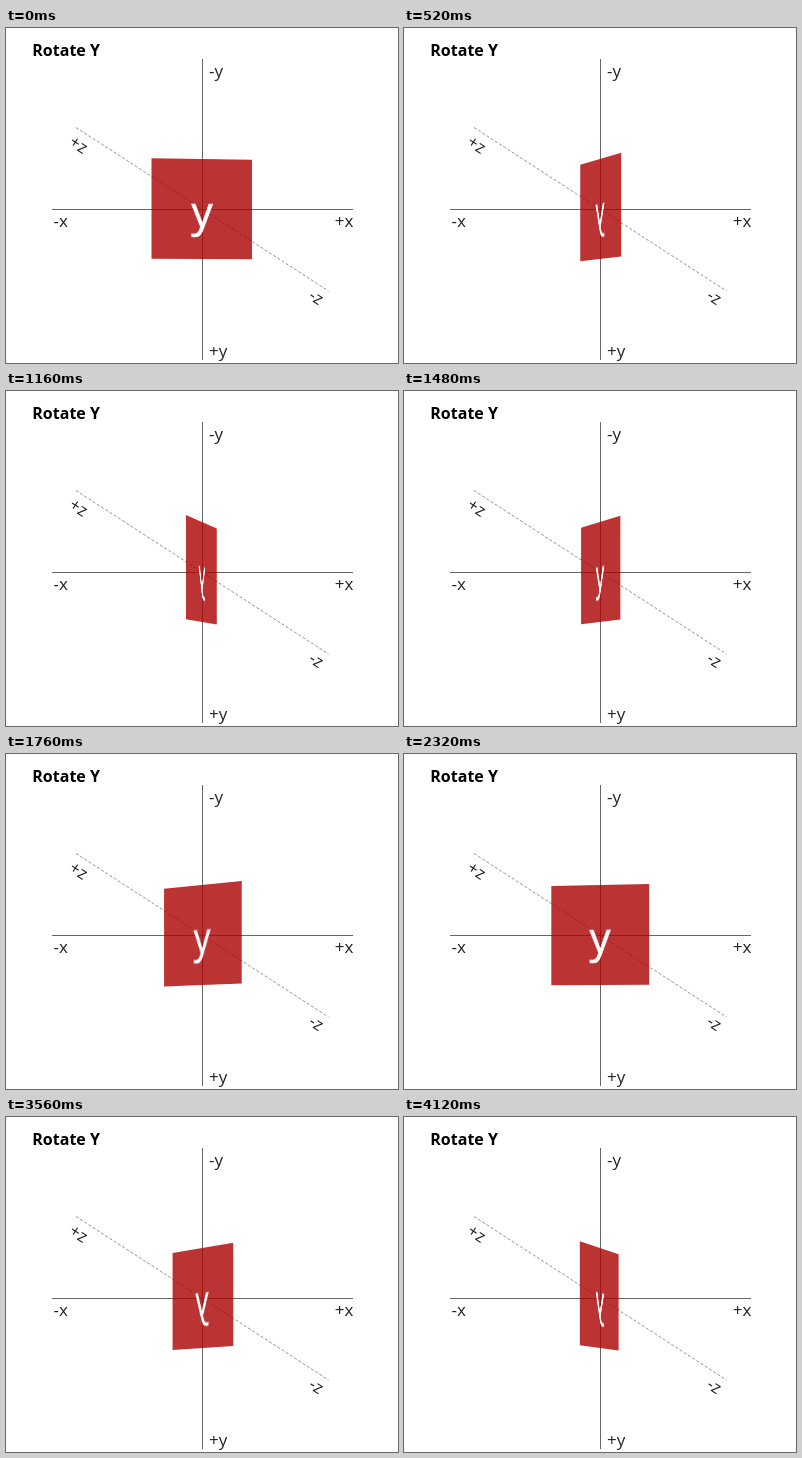
An HTML page for the animation above (4200 ms loop, 392 by 335 pixels).

```html
<!DOCTYPE html>
<html lang="en">
<head>
<meta charset="utf-8">
<title>Rotate Y</title>
<style>
  html, body { margin: 0; width: 100%; height: 100%; overflow: hidden; background: #fff; }
  .stage {
    position: relative;
    width: 392px;
    height: 335px;
    overflow: hidden;
    perspective: 1200px;
    perspective-origin: 316px 296px;
    font-family: "Open Sans", "Noto Sans", sans-serif;
  }
  svg { position: absolute; left: 0; top: 0; }
  text { font-size: 17px; fill: #222; }
  .title { font-size: 16px; font-weight: 700; fill: #000; }
  .axis { stroke: #666; stroke-width: 1; }
  .depth { stroke: #777; stroke-width: .8; stroke-dasharray: 3 2; }
  .face {
    position: absolute;
    left: 146px;
    top: 131px;
    width: 100px;
    height: 100px;
    background: rgba(170, 0, 0, .8);
    color: #fff;
    font-size: 42px;
    line-height: 104px;
    text-align: center;
    -webkit-text-stroke: .7px #fff;
  }
</style>
</head>
<body>
<div class="stage">
  <svg width="392" height="335">
    <text class="title" x="26.3" y="28">Rotate Y</text>
    <path class="axis" d="M46 181.5H347M196.5 31V332"/>
    <path class="depth" d="M70 99.5L322.5 263"/>
    <text x="203" y="49">-y</text>
    <text x="203" y="329">+y</text>
    <text x="47.5" y="199">-x</text>
    <text x="328.7" y="199">+x</text>
    <text transform="translate(62.1 116.6) rotate(33)">+z</text>
    <text transform="translate(301.5 270.3) rotate(33)">-z</text>
  </svg>
  <div class="face">y</div>
</div>
<script>
  const LOOP = 4200, STEP = 77.65, LEAD = 32, LAST = 53;
  const START = 0.034, TURN = 0.02605; // share of a turn's duration: at the first step, and per step

  const spin = document.querySelector('.face').animate(
    { transform: ['rotateY(0deg)', 'rotateY(360deg)'] },
    { duration: 1000, easing: 'ease', fill: 'both' }
  );
  spin.pause();

  const origin = performance.now();

  function draw(now) {
    const t = Math.max(0, now - origin) % LOOP;
    const step = Math.min(LAST, Math.floor((t + LEAD) / STEP));
    spin.currentTime = (START + TURN * step) % 1 * 1000;
    requestAnimationFrame(draw);
  }
  draw(origin);
</script>
</body>
</html>
```
